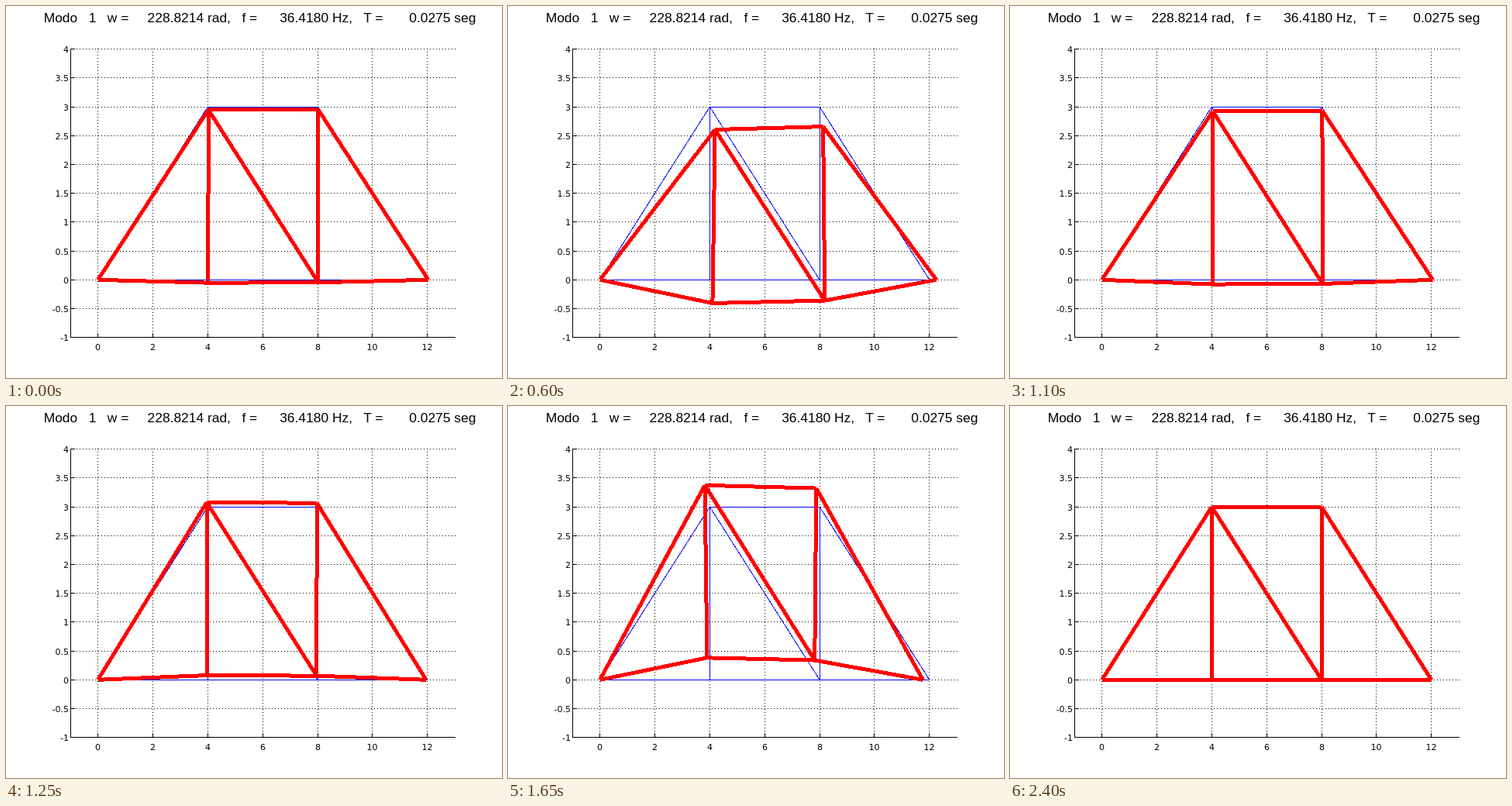
These frames come from a looping animation (640x480 px, 2.45 s). An HTML page:

```html
<!DOCTYPE html>
<html lang="es">
<head>
<meta charset="utf-8">
<title>Modo 1</title>
<style>
  html, body { margin: 0; width: 100%; height: 100%; overflow: hidden; background: #fff; }
  svg { display: block; }
  path { fill: none; stroke: #000; shape-rendering: crispEdges; }
  text { font: 11px "DejaVu Sans", sans-serif; }
  .title { font: 17.4px "Liberation Sans", Arial, sans-serif; white-space: pre; }
  .grid { stroke-dasharray: 1 3; }
  .rest { stroke: #00f; }
  .mode { stroke: #f00; stroke-width: 5; }
</style>
</head>
<body>
<svg width="640" height="480" viewBox="0 0 640 480"></svg>
<script>
const svg = document.querySelector('svg');
const FRAMES = 49, STEP = 50;

function add(tag, attrs, content = '') {
  const el = document.createElementNS('http://www.w3.org/2000/svg', tag);
  for (const key in attrs) el.setAttribute(key, attrs[key]);
  el.textContent = content;
  return svg.appendChild(el);
}

const px = x => 118.63 + 35.43 * x;
const py = y => 353.3 - 74.4 * y;
const snap = v => Math.floor(v) + 0.5;
const left = 83, right = 580, top_ = 55, bottom = 428;

// Axes with inward ticks and dotted grid
for (let x = 0; x <= 12; x += 2) {
  const at = snap(px(x));
  add('path', { class: 'grid', d: `M${at} ${bottom}V${top_}` });
  add('path', { d: `M${at} ${bottom}v-6` });
  add('text', { x: at, y: 444, 'text-anchor': 'middle' }, x);
}
for (let y = -1; y <= 4; y += 0.5) {
  const at = snap(py(y));
  add('path', { class: 'grid', d: `M${left} ${at}H${right}` });
  add('path', { d: `M${left} ${at}h6` });
  add('text', { x: 81, y: at + 4, 'text-anchor': 'end' }, y);
}
add('path', { d: `M83.5 ${top_}V427.5H${right}` });

add('text', { class: 'title', x: 48.7, y: 21 },
  'Modo   1   w =     228.8214 rad,   f =      36.4180 Hz,   T =       0.0275 seg');

// Each node: rest x, rest y, then its modal displacement in pixels
const nodes = [
  [0, 0, 0, 0], [4, 0, 3.6, 30.3], [8, 0, 6.7, 26.9],
  [12, 0, 9, 0], [4, 3, 6.8, 29.6], [8, 3, 4.6, 25.6]
];
const bars = [[0, 1], [1, 2], [2, 3], [0, 4], [4, 5], [5, 3], [4, 1], [4, 2], [5, 2]];

function truss(amplitude) {
  const points = nodes.map(([x, y, dx, dy]) =>
    `${(px(x) + amplitude * dx).toFixed(2)} ${(py(y) + amplitude * dy).toFixed(2)}`);
  return bars.map(([a, b]) => `M${points[a]}L${points[b]}`).join('');
}

add('path', { class: 'rest', d: truss(0) });
const mode = add('path', { class: 'mode' });

function draw() {
  const frame = Math.floor(performance.now() / STEP) % FRAMES;
  mode.setAttribute('d', truss(Math.sin(2 * Math.PI * (frame + 1) / FRAMES)));
  requestAnimationFrame(draw);
}
draw();
</script>
</body>
</html>
```
